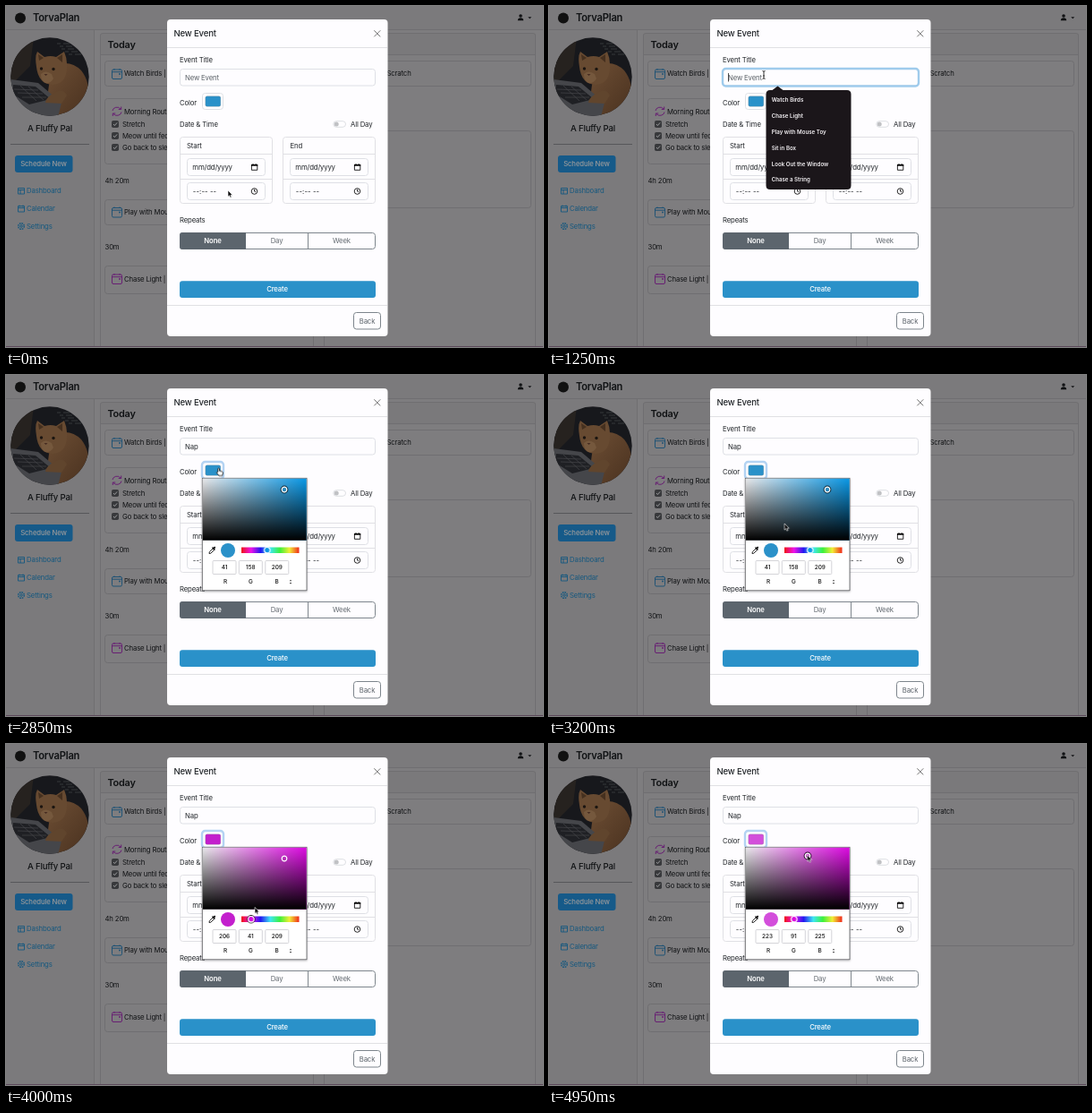
Recreate the animation shown at these times as an HTML page. Size 600x381 px, loop 5000 ms.

```html
<!DOCTYPE html>
<html lang="en">
<head>
<meta charset="utf-8">
<title>New Event</title>
<style>
html, body { margin: 0; width: 100%; height: 100%; overflow: hidden; background: #7e7d7f; }
svg { display: block; width: 100%; height: 100%; }
text { font: 400 7.75px Inter, sans-serif; letter-spacing: -.02em; fill: #212529; white-space: pre; }
.mid { text-anchor: middle; }
.h5 { font-size: 9.6px; font-weight: 500; }
.dim text { fill: #101214; }
.dim .link { fill: #15587f; }
.dim .light { fill: #98999b; }
.white { fill: #fff; font-weight: 500; }
.line { fill: none; stroke: #e0e0e4; }
.dim .line { stroke: #6f6e71; }
.icon { fill: none; stroke: #111; stroke-width: .9; }
.box { fill: #fefdff; stroke: #dee0e5; }
.list text { font-size: 6.15px; font-weight: 600; letter-spacing: 0; fill: #f4f1f4; }
.small text { font-size: 6.4px; font-weight: 500; fill: #111; text-anchor: middle; letter-spacing: 0; }

/* one percent is 50 ms */
#stage { animation: tint 5s step-end infinite; }
.show { opacity: 0; animation: 5s step-end infinite; }
.hint { animation-name: hint; }
.list { animation-name: list; }
.focus { animation-name: focus; }
.blink { animation-name: blink; }
.n { animation-name: n; }
.a { animation-name: a; }
.p { animation-name: p; }
.typed { animation-name: typed; }
.picker { animation-name: picker; }
.picked { animation-name: picked; }
.blue { animation-name: blue; }
.magenta { animation-name: magenta; }
.pink { animation-name: pink; }
.arrow { animation-name: arrow; }
.beam { animation-name: beam; }
.hand { animation-name: hand; }
#pointer { animation: pointer 5s ease-in-out infinite; }
#shade { animation: shade 5s step-end infinite; }
#thumb { animation: thumb 5s step-end infinite; }

@keyframes tint {
  0% { --c: #2a91c9; --hue: #0997e5; }
  76% { --c: #c31fcd; --hue: #db0ae0; }
  92%, 100% { --c: #d34edb; --hue: #db0ae0; }
}
@keyframes hint { 0% { opacity: 1 } 30%, 100% { opacity: 0 } }
@keyframes list { 16% { opacity: 1 } 30% { opacity: 0 } }
@keyframes focus { 16% { opacity: 1 } 55% { opacity: 0 } }
@keyframes blink { 16% { opacity: 1 } 26% { opacity: 0 } }
@keyframes n { 30%, 100% { opacity: 1 } }
@keyframes a { 32%, 100% { opacity: 1 } }
@keyframes p { 34%, 100% { opacity: 1 } }
@keyframes typed {
  30% { opacity: 1; transform: translateX(206.3px) }
  32% { opacity: 1; transform: translateX(210.6px) }
  34% { opacity: 1; transform: translateX(215.2px) }
  44% { opacity: 0 }
}
@keyframes picked { 55%, 100% { opacity: 1 } }
@keyframes picker { 56%, 100% { opacity: 1 } }
@keyframes blue { 0% { opacity: 1 } 76%, 100% { opacity: 0 } }
@keyframes magenta { 76% { opacity: 1 } 92% { opacity: 0 } }
@keyframes pink { 92%, 100% { opacity: 1 } }
@keyframes arrow { 0% { opacity: 1 } 12% { opacity: 0 } 49% { opacity: 1 } 51% { opacity: 0 } 60%, 100% { opacity: 1 } }
@keyframes beam { 12% { opacity: 1 } 30% { opacity: 0 } }
@keyframes hand { 51% { opacity: 1 } 60% { opacity: 0 } }
@keyframes pointer {
  0%, 1% { transform: translate(248px, 206px) }
  14%, 49% { transform: translate(240px, 77px) }
  52%, 58% { transform: translate(238px, 104.5px) }
  68%, 77% { transform: translate(275.5px, 196px) }
  87%, 100% { transform: translate(288.5px, 124px) }
}
@keyframes shade {
  0% { transform: translate(311px, 128px); stroke: #102a38 }
  76% { transform: translate(311px, 128px); stroke: transparent }
  92%, 100% { transform: translate(289px, 125px); stroke: #2c0a2e }
}
@keyframes thumb {
  0% { transform: translateX(291.7px); stroke: transparent }
  76% { transform: translateX(273.8px); stroke: #222 }
  92%, 100% { transform: translateX(273.8px); stroke: transparent }
}
</style>
</head>
<body>
<svg id="stage" viewBox="0 0 600 381" preserveAspectRatio="none">
  <defs>
    <clipPath id="round"><circle cx="49" cy="79" r="43.7"/></clipPath>
    <linearGradient id="fur" x2="1" y2="1"><stop stop-color="#6d4e34"/><stop offset="1" stop-color="#49311f"/></linearGradient>
    <linearGradient id="sat"><stop stop-color="#e9e9eb"/><stop offset="1" style="stop-color:var(--hue)"/></linearGradient>
    <linearGradient id="dark" x2="0" y2="1"><stop stop-opacity="0"/><stop offset="1"/></linearGradient>
    <linearGradient id="hues">
      <stop stop-color="#f01414"/><stop offset=".167" stop-color="#ee12e8"/><stop offset=".333" stop-color="#2418f0"/>
      <stop offset=".5" stop-color="#3ce6f2"/><stop offset=".667" stop-color="#3cf03c"/>
      <stop offset=".833" stop-color="#f2ee36"/><stop offset="1" stop-color="#f02a1a"/>
    </linearGradient>
    <filter id="soft"><feGaussianBlur stdDeviation=".7"/></filter>
    <filter id="shadow" x="-10%" y="-10%" width="120%" height="125%"><feDropShadow dx="0" dy="1" stdDeviation="1.2" flood-opacity=".3"/></filter>
    <g id="event" fill="none" stroke="currentColor" stroke-width=".9">
      <rect x="-5.5" y="-5" width="11" height="10.5" rx="1.5"/>
      <path d="M-5.5-2.3h11M-3-6v1.5M3-6v1.5"/>
      <rect x="2.2" y="-.8" width="1.6" height="1.6" fill="currentColor" stroke="none"/>
    </g>
    <g id="check">
      <rect x="-4" y="-4" width="8" height="8" rx="1.8" fill="#38393c"/>
      <path d="M-2 0l1.4 1.6 2.7-3.2" fill="none" stroke="#98999b"/>
    </g>
    <g id="when">
      <path class="line" d="M0 19.5h103M0 47.5h103"/>
      <rect class="line" x=".5" y=".5" width="103" height="74" rx="3"/>
      <rect class="box" x="8.5" y="24.5" width="87" height="19" rx="3"/>
      <rect class="box" x="8.5" y="51.5" width="87" height="19" rx="3"/>
      <text x="14.3" y="36.8">mm/dd/yyyy</text>
      <text x="14.8" y="63.8" style="letter-spacing:.01em">--:-- --</text>
      <path class="icon" d="M80.4 31.5h6.4v5.8h-6.4zM82 30v1.5M85.2 30v1.5"/><path d="M80 31h7.2v1.7H80z"/>
      <g class="icon"><circle cx="83.5" cy="61" r="3.3"/><path d="M83.5 58.7V61l1.6 1"/></g>
    </g>
  </defs>

  <g class="dim">
    <path fill="#7e7d7f" d="M0 0h600v381H0z"/>
    <path fill="#7b7a7c" d="M0 0h600v26H0zM0 27h98v354H0z"/>
    <path class="line" d="M0 26.5h600M98.5 27v354"/>
    <circle cx="16" cy="13.5" r="6" fill="#111"/>
    <text x="30" y="17" style="font-size:11.2px;font-weight:600">TorvaPlan</text>
    <g fill="#101113"><circle cx="575" cy="11" r="1.8"/><path d="M571.8 16.2q0-3 3.2-3t3.2 3zM583.2 12.2h4l-2 2.1z"/></g>

    <g clip-path="url(#round)">
      <path fill="#17181c" d="M5 35h90v90H5z"/>
      <path fill="#26221f" d="M5 35h26l-4 32-22 22z"/>
      <path stroke="#4a4d50" stroke-width=".6" stroke-dasharray="4 3 7 4" d="M57 42h26M60 45h24M62 48h25M66 51h22M70 54h20"/>
      <g filter="url(#soft)">
        <path fill="url(#fur)" d="M56 66q16-6 28 6 10 12 9 36l-14 14H52q-12-24 4-56z"/>
        <path fill="#674a31" d="M34 68q-2-12 1-17l8 6q7-2 13 0l9-6q4 9 3 19-1 17-16 18-16-1-18-20z"/>
        <path fill="#45301f" d="M36 54l1 7 5-3zM63 54l-6 4 6 5z"/>
        <path fill="#75583d" d="M39 76q5-5 12 0l2 5q-3 6-9 5-5-2-5-10z"/>
        <circle cx="39.5" cy="70" r="1.7" fill="#1b1511"/><circle cx="53" cy="70.500" r="1.7" fill="#1b1511"/>
        <path fill="#452b21" d="M42.500 76h4l-2 2z"/>
      </g>
      <path fill="#45464a" d="M5 82l31 4 26 22-4 16H5z"/>
      <path fill="#1f2024" d="M8 88l25 2 17 14-24 6-19-12z"/>
      <path fill="none" stroke="#45464a" stroke-width=".7" d="M9 93l27 1M13 97l28 1M18 102l27 0M16 89l18 17M25 90l17 15"/>
      <path fill="#60452d" d="M56 96q9-4 12 4l-6 9-18-1q0-6 12-12z"/>
    </g>
    <text class="h5 mid" x="49" y="140">A Fluffy Pal</text>
    <path stroke="#57575a" d="M5 154.500h88"/>
    <rect x="10" y="167" width="64.500" height="19" rx="3" fill="#165a89"/>
    <text class="mid light" x="42" y="179.300" style="font-weight:500">Schedule New</text>
    <g fill="none" stroke="#15587f" stroke-width=".9">
      <path d="M13.500 203.500h7v6.500h-7zM13.500 205.500h7M16 205.500v4.500M13.500 223.500h7v6.500h-7zM13.500 225.500h7M15 222.500v2M19 222.500v2"/>
      <circle cx="17" cy="246" r="1.300"/><circle cx="17" cy="246" r="3.300" stroke-width="1.400" stroke-dasharray="1.700 .89"/>
    </g>
    <text class="link" x="23" y="209.300">Dashboard</text>
    <text class="link" x="23" y="229.300">Calendar</text>
    <text class="link" x="23" y="249.300">Settings</text>

    <path fill="#7a797b" d="M105 31h239v23H105zM355 31h237v23H355z"/>
    <g class="line">
      <path d="M105.500 381V33q0-2.500 2.500-2.500h233q2.500 0 2.500 2.500v348M105 54.500h239M355.500 381V33q0-2.500 2.500-2.500h231q2.500 0 2.500 2.500v348M355 54.500h237"/>
      <rect x="110.500" y="61.500" width="228" height="28" rx="3"/>
      <rect x="110.500" y="103.500" width="228" height="73" rx="3"/>
      <rect x="110.500" y="216.500" width="228" height="28" rx="3"/>
      <rect x="110.500" y="290.500" width="228" height="31" rx="3"/>
      <rect x="360.500" y="61.500" width="226" height="28" rx="3"/>
      <rect x="360.500" y="139.500" width="226" height="86" rx="3"/>
    </g>
    <text x="113.500" y="46.500" style="font-size:10.900px;font-weight:600">Today</text>
    <use href="#event" x="124" y="76" color="#164f74"/><text x="132" y="78.300">Watch Birds |</text>
    <path d="M119 117a5 4.500 0 0 1 9-2M129 118.500a5 4.500 0 0 1-9 2M128.700 112.500v3h-3M119.300 123v-3h3" fill="none" stroke="#661572" stroke-width=".9"/>
    <text x="132" y="120.800">Morning Routine</text>
    <use href="#check" x="122" y="132"/><text x="130" y="135">Stretch</text>
    <use href="#check" x="122" y="145"/><text x="130" y="148">Meow until fed</text>
    <use href="#check" x="122" y="158"/><text x="130" y="161">Go back to sleep</text>
    <text x="110.500" y="198.300">4h 20m</text>
    <use href="#event" x="124" y="230.500" color="#164f74"/><text x="132" y="233.300">Play with Mouse Toy</text>
    <text x="110.500" y="272.300">30m</text>
    <use href="#event" x="124" y="305" color="#661572"/><text x="132" y="307.800">Chase Light |</text>
    <text x="425.500" y="78.300">Scratch</text>
    <path fill="#5c4a5b" d="M0 380h600v1H0z"/>
  </g>

  <g>
    <rect x="180" y="15" width="246.500" height="354" rx="4" fill="#fefdff"/>
    <path class="line" d="M180 46.500h246M180 334.500h246"/>
    <text class="h5" x="187.500" y="34">New Event</text>
    <path d="M411.300 27.300l7 7m0-7l-7 7" stroke="#666" stroke-width=".9"/>
    <text x="194" y="63.300">Event Title</text>
    <rect class="box" x="194.500" y="70.500" width="218" height="18.500" rx="3"/>
    <rect class="show focus" x="194" y="70" width="219" height="19.500" rx="3.500" fill="none" stroke="#9fcbec" stroke-width="2.400"/>
    <text class="show hint" x="200" y="82.600" style="fill:#5a6066">New Event</text>
    <text class="show n" x="200" y="82.600">N</text>
    <text class="show a" x="205.700" y="82.600">a</text>
    <text class="show p" x="210" y="82.600">p</text>
    <path class="show blink" d="M200.500 75v9.500" stroke="#222" stroke-width=".8"/>
    <path class="show typed" d="M0 75v9.500" stroke="#222" stroke-width=".8"/>
    <text x="194" y="111.300">Color</text>
    <rect class="box" x="219.500" y="97.500" width="23" height="18" rx="3"/>
    <rect class="show picked" x="219" y="97" width="24" height="19" rx="3.500" fill="none" stroke="#b3d3f3" stroke-width="2.400"/>
    <rect x="222.800" y="100.800" width="17" height="11.500" rx="1.800" style="fill:var(--c)" stroke="#777" stroke-opacity=".5" stroke-width=".5"/>
    <text x="194" y="134.800">Date &amp; Time</text>
    <rect x="365.800" y="128.700" width="13.700" height="6.600" rx="3.300" fill="#fefdff" stroke="#dadce0" stroke-width=".9"/>
    <circle cx="369.200" cy="132" r="2.500" fill="#c0c1c4"/>
    <text x="385" y="134.800">All Day</text>
    <use href="#when" x="194" y="146"/><text x="202" y="159.300">Start</text>
    <use href="#when" x="309" y="146"/><text x="317.500" y="159.300">End</text>
    <text x="194" y="241.800">Repeats</text>
    <rect x="194.500" y="253.500" width="218" height="18" rx="3" fill="#fefdff" stroke="#7d858c"/>
    <path d="M268 253h-71q-3 0-3 3v13q0 3 3 3h71z" fill="#5c656d"/>
    <path d="M337.500 253v19" stroke="#7d858c"/>
    <text class="mid white" x="231" y="265.200" style="font-weight:600">None</text>
    <text class="mid" x="302.500" y="265.200" style="fill:#62696f">Day</text>
    <text class="mid" x="375" y="265.200" style="fill:#62696f">Week</text>
    <rect x="194" y="307.300" width="219" height="18.600" rx="3" fill="#2a91c9"/>
    <text class="mid white" x="303" y="319.300">Create</text>
    <rect x="388.500" y="342.500" width="30" height="18.500" rx="3" fill="#fefdff" stroke="#7d858c"/>
    <text class="mid" x="403.500" y="354.700" style="fill:#5c636a">Back</text>
  </g>

  <g class="show list">
    <path d="M247 94h2.500l6-4.500 6 4.500H333q4.500 0 4.500 4.500v102q0 4.500-4.500 4.500H247q-4.500 0-4.500-4.500v-102q0-4.500 4.500-4.500z" fill="#1b161a"/>
    <text x="248.700" y="107.300">Watch Birds</text>
    <text x="248.700" y="125.100">Chase Light</text>
    <text x="248.700" y="142.900">Play with Mouse Toy</text>
    <text x="248.700" y="160.700">Sit in Box</text>
    <text x="248.700" y="178.500">Look Out the Window</text>
    <text x="248.700" y="196.300">Chase a String</text>
  </g>

  <g class="show picker">
    <rect x="219.300" y="115.300" width="116.700" height="125.500" fill="#fff" stroke="#5a5a5e" stroke-width=".8" filter="url(#shadow)"/>
    <path fill="url(#sat)" d="M219.700 115.700h116v69h-116z"/><path fill="url(#dark)" d="M219.700 115.700h116v69h-116z"/>
    <g id="shade"><circle r="3.800" fill="none" stroke-width="1.200"/><circle r="2.800" fill="none" stroke="#fff" stroke-width="1.200"/></g>
    <path d="M227 199.500l.3-1.800 3.600-3.600 1.500 1.500-3.600 3.600z" fill="none" stroke="#111" stroke-width=".9"/>
    <path d="M230 193l1-1 .8.800 1-1q1.400-.5 1.300 1.300l-1 1 .8.800-1 1z" fill="#111"/>
    <circle cx="248" cy="196" r="8" style="fill:var(--c)"/>
    <rect x="263" y="192.500" width="64.500" height="6.500" fill="url(#hues)"/>
    <g id="thumb"><circle cy="195.700" r="4.300" fill="none" stroke-width="1"/><circle cy="195.700" r="3.200" style="fill:var(--hue)" stroke="#fff" stroke-width="1.200"/></g>
    <g fill="#fff" stroke="#d0d0d4" stroke-width=".9">
      <rect x="231" y="207.500" width="26" height="15" rx="1"/><rect x="260.300" y="207.500" width="26" height="15" rx="1"/><rect x="289.800" y="207.500" width="26" height="15" rx="1"/>
    </g>
    <g class="small">
      <text x="245" y="233.300">R</text><text x="273.500" y="233.300">G</text><text x="302.500" y="233.300">B</text>
      <path d="M316.700 230.200l1.300-1.500 1.300 1.500zM316.700 232l1.300 1.500 1.300-1.500z" fill="#333"/>
    </g>
  </g>
  <g class="show picker small">
    <g class="show blue"><text x="244" y="217.200">41</text><text x="273.300" y="217.200">158</text><text x="302.800" y="217.200">209</text></g>
    <g class="show magenta"><text x="244" y="217.200">206</text><text x="273.300" y="217.200">41</text><text x="302.800" y="217.200">209</text></g>
    <g class="show pink"><text x="244" y="217.200">223</text><text x="273.300" y="217.200">91</text><text x="302.800" y="217.200">225</text></g>
  </g>

  <g id="pointer" stroke-linejoin="round">
    <path class="show arrow" d="M0 0v7.200l1.600-1.500 1.100 2.500 1.300-.6-1.100-2.400h2.200z" fill="#0b0b0c" stroke="#fff" stroke-width=".6"/>
    <path class="show beam" d="M-1.500-4.500q1.500 0 1.500 1.300v6.400q0 1.300-1.500 1.300M1.500-4.500q-1.500 0-1.500 1.300M1.500 4.500q-1.500 0-1.500-1.300M-1 1h2" fill="none" stroke="#222" stroke-width=".9"/>
    <path class="show hand" d="M-1.200 4V0q.8-1 1.600 0v2.600l3.200.8q1 .4.800 1.600L3.700 8H0l-2.700-3.300q.2-1.200 1.500-.7z" fill="#fff" stroke="#111" stroke-width=".8"/>
  </g>
</svg>
</body>
</html>
```
